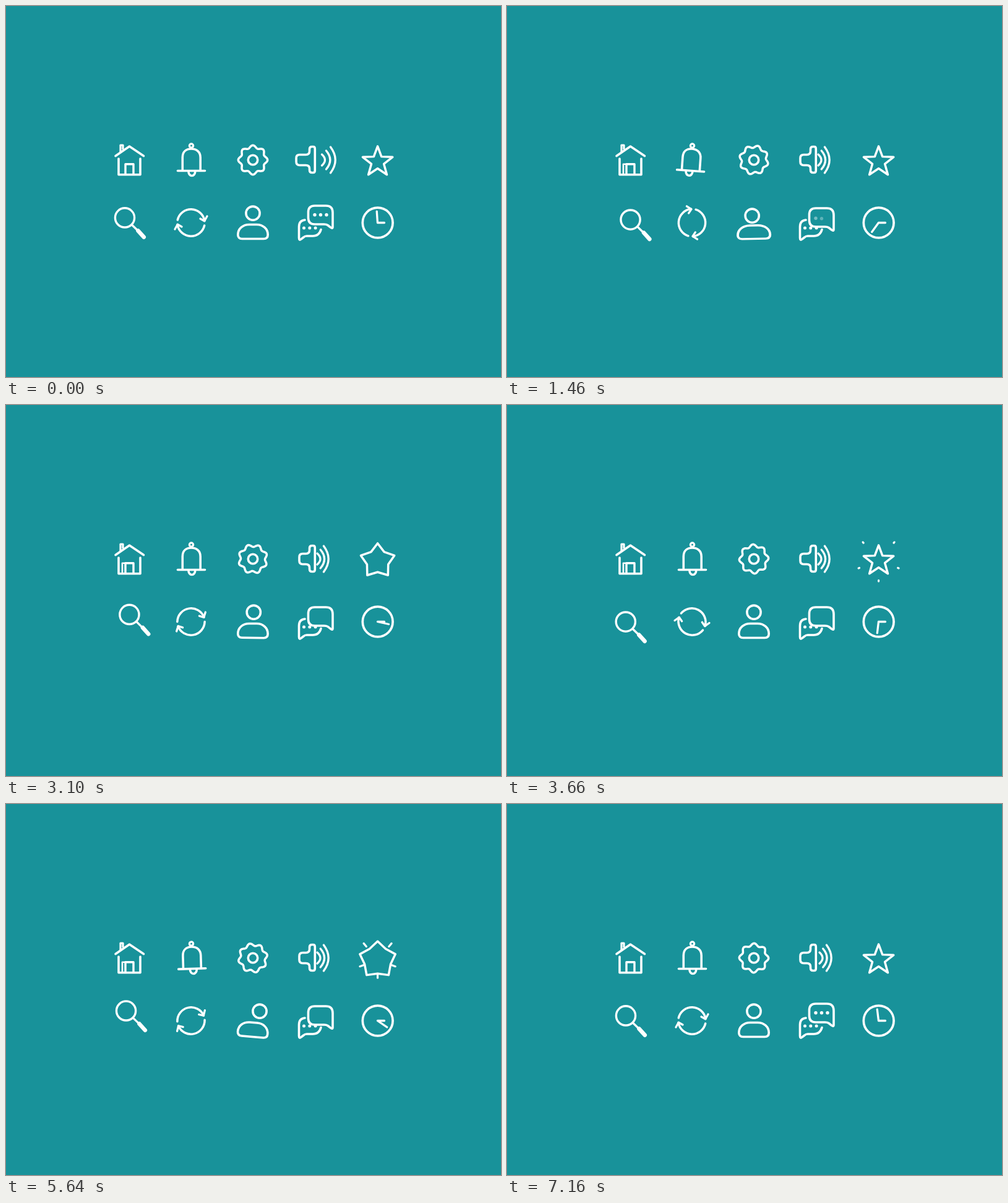
An HTML page with a canvas that plays this animation: 800x600 px, repeating every 7.18 s.

```html
<!DOCTYPE html>
<html lang="en">
<head>
<meta charset="utf-8">
<title>Line icons</title>
<style>
html, body { margin: 0; height: 100%; overflow: hidden; background: #18929a; }
canvas { display: block; }
</style>
</head>
<body>
<canvas id="stage" width="800" height="600"></canvas>
<script>
const c = document.getElementById('stage').getContext('2d');
const LOOP = 7180, SHORT = LOOP / 3, LONG = LOOP / 2, RAD = Math.PI / 180;

const clamp = v => Math.min(1, Math.max(0, v));

// Eased step from 0 to 1 between two times.
function ease(t, from, to) {
  const u = clamp((t - from) / (to - from));
  return u * u * (3 - 2 * u);
}

// Eased rise to 1, then back to 0.
const pulse = (t, rise, top, fall, end) => ease(t, rise, top) - ease(t, fall, end);

function line(d, width = 3.6) {
  c.lineWidth = width;
  c.stroke(new Path2D(d));
}

function ring(x, y, r, width = 3.6) {
  c.lineWidth = width;
  c.beginPath();
  c.arc(x, y, r, 0, 7);
  c.stroke();
}

function dot(x, y, r) {
  c.beginPath();
  c.arc(x, y, r, 0, 7);
  c.fill();
}

// Closed outline around 0,0 from a radius for each angle.
function outline(step, radius) {
  c.beginPath();
  for (let a = 0; a < 360; a += step) {
    const r = radius(a);
    c.lineTo(r * Math.sin(a * RAD), -r * Math.cos(a * RAD));
  }
  c.closePath();
  c.lineWidth = 3.5;
  c.stroke();
}

function group(draw) {
  c.save();
  draw();
  c.restore();
}

function spin(x, y, degrees) {
  c.translate(x, y);
  c.rotate(degrees * RAD);
  c.translate(-x, -y);
}

function house(t) {
  line('M177 242.5L199.5 227L222.5 242.5');
  line('M185 236V225H189V231', 3.2);
  line('M182 247V272.8H217V247');
  line('M193 272V255.7H206V272', 3.4);
  const open = 112 * pulse(t, 250, 700, 1600, 2000);
  if (open > 0) line(`M193 255.7H${193 + 13.5 * Math.cos(open * RAD)}V272`, 2.6);
}

// A swing that dies away.
function bell(t) {
  const swing = 6.2 * ease(t, 70, 700) * clamp((2500 - t) / 1570);
  const angle = -swing * Math.cos((t - 930) / 1090 * 2 * Math.PI);
  group(() => {
    spin(299.5, 226, angle);
    ring(299.5, 226, 3.1, 3.3);
    line('M285.3 266V245C285.3 236 291 231 299.5 231S314.2 236 314.2 245V266');
    line('M277.5 266.5H321.5');
    c.translate(0.7 - 0.7 * angle, 0);
    line('M294.3 268A5.3 6.5 0 0 0 305 268');
  });
}

function gear(t) {
  group(() => {
    c.translate(399, 249);
    ring(0, 0, 7.7);
    c.rotate(-t / LOOP * 2 * Math.PI);
    outline(3, a => 21.6 + 2.1 * Math.cos(8 * a * RAD));
  });
}

// Two beats per cycle: a sharp kick, then the waves settle back.
function speaker(t) {
  const beat = t < 1980 ? t : t - 1980;
  const spread = clamp(1 - beat / 540);
  const x = 474 - 5 * clamp(1 - beat / 100);
  line(`M${x} 246Q${x} 240.5 ${x + 5.5} 240.5H484.5Q490.5 240.5 490.5 235V231.5
    Q490.5 227.5 494.5 227.5H496.5Q499.3 227.5 499.3 231V266Q499.3 269.5 496.5 269.5H494.5
    Q490.5 269.5 490.5 265V263Q490.5 257.5 484.5 257.5H${x + 5.5}Q${x} 257.5 ${x} 252Z`);
  for (let i = 0; i < 3; i++) {
    const right = 508 + 6.6 * i + (7.5 + 1.8 * i) * spread;
    const depth = 5 + 1.4 * i, h = 9 + 6 * i;
    line(`M${right - depth} ${249 - h}Q${right + depth} 249 ${right - depth} ${249 + h}`, 3.3);
  }
}

function star(t) {
  const puff = pulse(t, 480, 860, 860, 1180);
  group(() => {
    c.translate(600.6, 252.2);
    outline(36, a => a % 72 ? 10.6 + 11.5 * puff : 25.4 + 4.8 * puff);
    const u = (t - 760) / 580;
    if (u < 0 || u > 1) return;
    const tail = 0.7 + 0.36 * u, head = 0.7 + 0.36 * (1 - (1 - u) ** 6);
    for (let i = -2; i <= 2; i++) {
      const a = (90 + 70 * i) * RAD, r = 31 + 1.6 * i * i;
      const x = r * Math.cos(a), y = r * Math.sin(a);
      line(`M${x * tail} ${y * tail}L${x * head} ${y * head}`, 3.2);
    }
  });
}

// The glass drifts out, circles once and drifts home.
function search(t) {
  const r = 8.2 * pulse(t, 60, 500, 1650, 2350);
  const a = 2 * Math.PI * ease(t, 530, 1630);
  group(() => {
    c.translate(r * Math.cos(a), -r * Math.sin(a));
    ring(192, 342.4, 15.6, 3.4);
    line('M203.5 354L212 362.3', 3.3);
    line('M213.5 363.5L222.8 373.8', 6.5);
  });
}

function refresh(t) {
  const turn = 180 * ease(t, 1100, 1800) - 15 * pulse(t, 500, 800, 950, 1250);
  group(() => {
    spin(299, 350.5, turn);
    for (let i = 0; i < 2; i++) {
      line('M277.3 346A22.3 22.3 0 0 1 321 347.5', 3.5);
      line('M314 344L320.7 347.8L325 340', 3.3);
      spin(299, 350.5, 180);
    }
  });
}

// Leans left, hops over to the right, then straightens up.
function person(t) {
  const lean = 2 * ease(t, 1130, 1930) - ease(t, 200, 850) - ease(t, 2550, 3250);
  const squash = pulse(t, 1150, 1460, 1460, 1800);
  ring(399 + 11 * lean, 335.2 + 4 * squash, 11.1);
  group(() => {
    spin(399, 366, 5 * lean);
    c.translate(399, 376.5);
    c.scale(1 + 0.08 * squash, 1 - 0.06 * squash);
    line(`M-17.5 0H17.5C22 0 24.2 -2.5 24.2 -6.5C24.2 -16 16.5 -23 6 -23H-6
      C-16.5 -23 -24.2 -16 -24.2 -6.5C-24.2 -2.5 -22 0 -17.5 0Z`);
  });
}

function chat(t) {
  line(`M483 346Q473.5 347 473.5 357V375Q473.5 380 477 377L481 374
    Q483 372 486 372H496Q506 372 509 361.5`);
  for (let i = 0; i < 3; i++) dot(481.5 + 9.3 * i, 359, 2.5);
  group(() => {
    c.translate(0, 4 * pulse(t, 107, 750, 1460, 2250));
    line(`M499 323H517Q528 323 528 334V357Q528 361 524.5 358L520 354.5
      Q518 353 514 353H499Q488.5 353 488.5 342.5V333.5Q488.5 323 499 323Z`);
    for (let i = 0; i < 3; i++) {
      const gone = clamp((t - 60 - (2 - i) * 150) / 200);
      const back = clamp((t - 1380 - 20 * i * i) / 200);
      c.globalAlpha = Math.max(1 - gone, back);
      dot(499 + 9.5 * i, 337.8 + 4 * (gone - back) * (1 - back), 2.7);
    }
  });
}

function clock(t) {
  ring(600.7, 350.5, 24.4, 3.7);
  const a = (360 * t / SHORT - 4) * RAD;
  line(`M611.5 350.5H600.5L${600.5 + 18.5 * Math.sin(a)} ${350.5 - 18.5 * Math.cos(a)}`, 3.3);
}

function frame(t) {
  c.fillStyle = '#18929a';
  c.fillRect(0, 0, 800, 600);
  c.strokeStyle = c.fillStyle = '#fff';
  c.lineCap = c.lineJoin = 'round';
  for (const icon of [house, speaker, star, search, refresh, chat, clock]) icon(t % SHORT);
  for (const icon of [bell, person]) icon(t % LONG);
  gear(t);
}

const start = performance.now();
(function tick() {
  frame((performance.now() - start) % LOOP);
  requestAnimationFrame(tick);
})();
</script>
</body>
</html>
```
